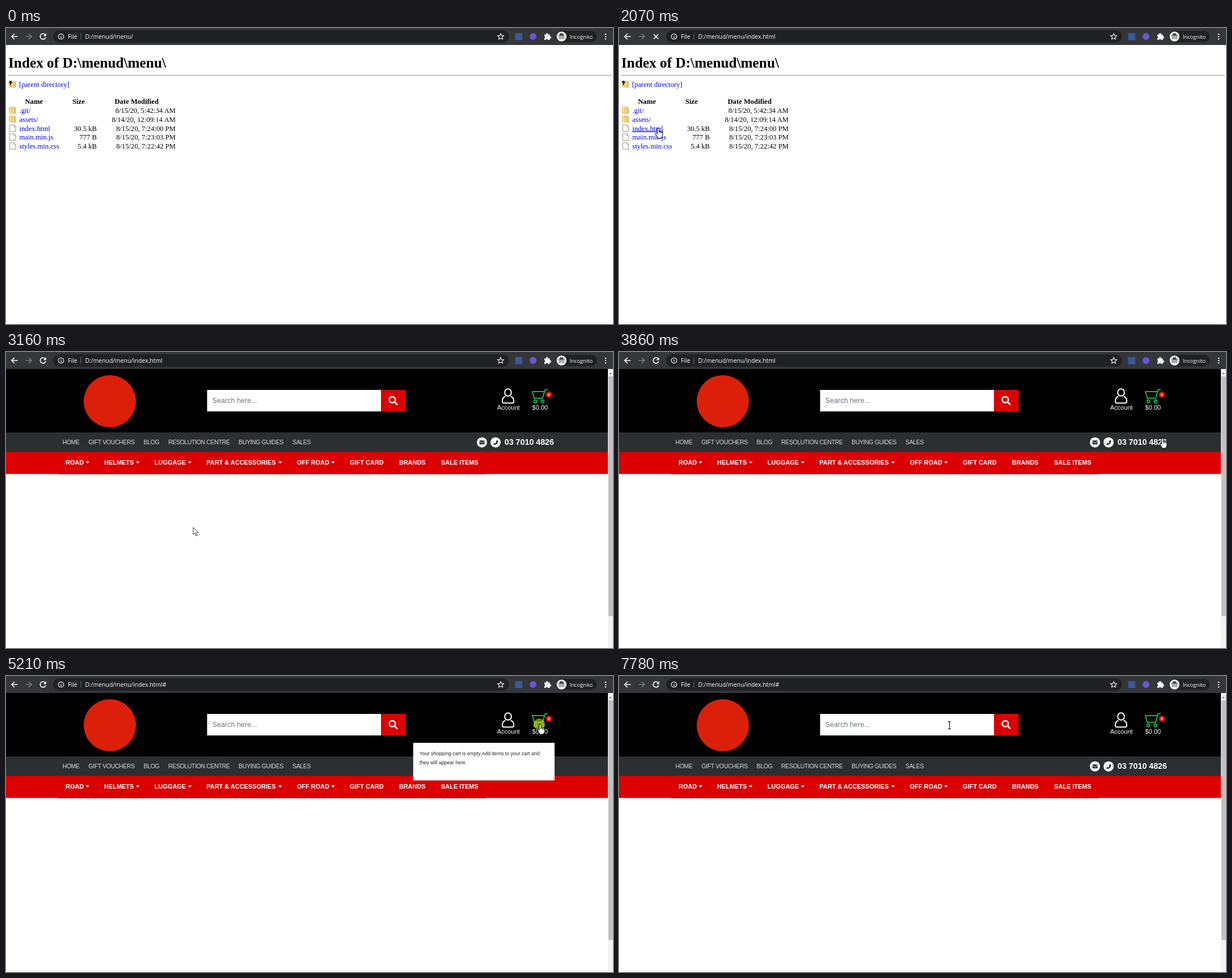
An HTML page for the animation above (8 s loop, 1070 by 523 pixels).

```html
<!DOCTYPE html>
<html lang="en">
<head>
<meta charset="utf-8">
<title>Menu demo</title>
<style>
  html, body { margin: 0; width: 100%; height: 100%; overflow: hidden; background: #fff; }
  svg { display: block; width: 1070px; height: 523px; }
  text { white-space: pre; }
  .ui { font-family: "Open Sans", "Noto Sans", sans-serif; fill: #fff; }
  .list { font: 12.63px "Liberation Serif", "Times New Roman", serif; fill: #000; }
  .list .link { fill: #0000ee; }
  .bold { font-weight: bold; }
  .shop { font-family: "Liberation Sans", Arial, sans-serif; font-size: 11.05px; fill: #fff; }
  .top { font-size: 10.5px; letter-spacing: -.35px; fill: #d9dadb; }
  .menu { font-size: 10.95px; font-weight: bold; }
  .line { fill: none; stroke: #fff; stroke-width: 1.6; }
  .thin { stroke-width: 1.1; }
  .thick { stroke-width: 2; }
  .lens { stroke-width: 2.5; }
  .green { stroke: #1fb24a; }
  .faded { stroke: #7d7e81; }
  .end { text-anchor: end; }
</style>
</head>
<body>
<svg viewBox="0 0 1070 523" xmlns="http://www.w3.org/2000/svg">
  <defs>
    <linearGradient id="gold"><stop offset="0" stop-color="#fbe7a6"/><stop offset="1" stop-color="#e3b44c"/></linearGradient>
    <g id="folder">
      <path d="M0 1.5 5 0v12L0 11Z" fill="#f7dc8b" stroke="#d3a64a" stroke-width=".6"/>
      <path d="M5 1h5.5l1 2v9H5Z" fill="url(#gold)" stroke="#d3a64a" stroke-width=".6"/>
    </g>
    <path id="file" d="M.5.5h7.5l3 3v8.5H.5Z M8 .5v3h3" fill="#fbfbfb" stroke="#8c8c8c" stroke-width=".9"/>
  </defs>

  <rect width="1070" height="523" fill="#fff"/>

  <g id="dir" class="list">
    <text x="4" y="69.8" class="bold" font-size="25.27">Index of D:\menud\menu\</text>
    <rect x="4" y="83" width="1064" height="1" fill="#a5a5a5"/>
    <rect x="4" y="84" width="1064" height="1" fill="#e3e3e3"/>
    <use href="#folder" x="5.5" y="93"/>
    <path d="M7 101v-4H4.3L8 92.500 11.700 97H9v4Z" fill="#222"/>
    <text x="23" y="103.5" class="link">[parent directory]</text>
    <g class="bold">
      <text x="33.5" y="134">Name</text><text x="117" y="134">Size</text><text x="191.5" y="134">Date Modified</text>
    </g>
  </g>

  <g id="site" class="shop">
    <rect y="30" width="1061" height="112" fill="#000"/>
    <rect y="142" width="1061" height="35" fill="#2c2f32"/>
    <rect y="176.5" width="1061" height="39" fill="#dc0000"/>
    <rect x="92" y="215" width="753" height="1" fill="#dc0000"/>
    <circle cx="183" cy="87" r="46" fill="#dc1f08"/>

    <rect x="354.5" y="67" width="307" height="38" fill="#fff"/>
    <text x="363.5" y="90" font-size="12.63" fill="#6c757d">Search here...</text>
    <rect id="caret" x="364" y="79" width="1" height="14" fill="#222"/>
    <rect x="661" y="67" width="43.5" height="38" fill="#dc0000"/>
    <g class="line lens">
      <circle cx="681" cy="84.3" r="5.3"/><path d="M684.8 88.2 690 93.3"/>
    </g>

    <g class="line thick">
      <rect x="879.2" y="65.3" width="11.6" height="12.4" rx="5.6"/>
      <path d="M880.5 78.5Q875 80.5 875 86v1.5q0 2.7 2.7 2.7h14.6q2.7 0 2.7-2.7V86q0-5.5-5.5-7.5"/>
    </g>
    <text x="865.7" y="102">Account</text>
    <g class="line thick green">
      <path d="M955 66.500h-4.500l-4.600 15.200h-14.700L928 70h20.500"/>
      <circle cx="933.2" cy="87.2" r="2.5"/><circle cx="945.8" cy="87.2" r="2.5"/>
    </g>
    <circle cx="957" cy="75.5" r="5.7" fill="#dc0000"/>
    <text x="957" y="78.3" font-size="8" class="bold" text-anchor="middle">0</text>
    <text x="927.6" y="102">$0.00</text>

    <circle cx="839" cy="159.7" r="9"/><circle cx="863" cy="159.7" r="9"/>
    <rect x="834.5" y="156.3" width="9" height="7" rx="1" fill="#2c2f32"/>
    <path d="M834.5 157.8 839 161l4.5-3.2" fill="none" stroke="#fff" stroke-width=".8"/>
    <path d="M866.3 155.2l1.1 2.8q-.6 5.2-6.2 6.3l-2.5-1.2 1.8-2.2 1.7.7q1.6-.8 2.2-2.3l-.9-1.6Z" fill="#2c2f32"/>
    <text x="878.8" y="164" font-size="14.25" class="bold">03 7010 4826</text>

    <rect x="1061" y="30" width="9" height="493" fill="#f1f1f1"/>
    <rect x="1062" y="43" width="8" height="423.5" fill="#c1c1c1"/>
    <path d="M1063 39.2h5l-2.5-3Z" fill="#777"/>

    <g id="drop">
      <rect x="717.8" y="118" width="249.2" height="66.5" rx="1" fill="#fff"/>
      <g font-size="8.75" fill="#212529">
        <text x="729" y="140">Your shopping cart is empty.Add items to your cart and</text>
        <text x="729" y="156">they will appear here.</text>
      </g>
    </g>
  </g>

  <g class="ui">
    <rect width="1070" height="30" fill="#35363a"/>
    <rect x="83" y="4" width="803.5" height="22" rx="11" fill="#202124"/>
    <path class="line" d="M20.500 15H10M15 10l-5 5 5 5"/>
    <path class="line faded" d="M34.500 15H45M40 10l5 5-5 5"/>
    <g id="reload">
      <path class="line" d="M69 11.800A4.900 4.900 0 1 0 70 16.200"/><path d="M70.800 9.200v5h-5Z"/>
    </g>
    <path id="stop" class="line" d="M61 11l8.500 8.500M69.500 11 61 19.500"/>
    <circle class="line thin" cx="97" cy="15" r="4.8"/>
    <path d="M96.400 14.200h1.200v3.600h-1.200ZM96.400 12h1.200v1.300h-1.200Z"/>
    <text x="109" y="19" font-size="10.5">File</text>
    <rect x="131.5" y="9" width="1" height="12" fill="#6b6c70"/>
    <text id="url" x="139.5" y="19" font-size="10.4"></text>
    <path class="line thin" transform="translate(872 15.3)"
      d="M0-5.500 1.600-1.900 5.400-1.600 2.500.9 3.400 4.600 0 2.600-3.400 4.600-2.500.9-5.400-1.600-1.600-1.900Z"/>
    <rect x="897.5" y="9" width="12.5" height="12.5" fill="#36599f"/>
    <circle cx="929" cy="15" r="6" fill="#6a55d8"/>
    <path d="M949 11.500h3a1.900 1.900 0 1 1 3.600 0h3v3.300a1.900 1.900 0 1 1 0 3.600v2.600h-3.300a1.800 1.800 0 0 0-3.500 0H949v-3a1.900 1.900 0 0 0 0-3.500Z"/>
    <rect x="969.5" y="5" width="72" height="20" rx="10" fill="#202124"/>
    <circle cx="979.3" cy="15" r="8.7" fill="#f1f3f4"/>
    <g fill="#35363a">
      <path d="M973.500 13.300h11.600v1.100h-11.600ZM975.500 12.700l1.100-3.500 2.700.6 2.700-.6 1.100 3.500ZM978 16.700h2.600v.8H978Z"/>
      <circle cx="976.5" cy="17.5" r="2"/><circle cx="982.1" cy="17.5" r="2"/>
    </g>
    <g fill="#f1f3f4">
      <circle cx="976.5" cy="17.5" r="1.2"/><circle cx="982.1" cy="17.5" r="1.2"/>
    </g>
    <text x="993.8" y="18.5" font-size="9.3">Incognito</text>
    <circle cx="1057" cy="11" r="1.2"/><circle cx="1057" cy="15.2" r="1.2"/><circle cx="1057" cy="19.4" r="1.2"/>
  </g>

  <circle id="press" r="10" fill="#ffff00" fill-opacity=".5"/>
  <g id="pointer" stroke-linejoin="round">
    <path id="arrow" d="M0 0v12.600l2.900-2.700 2.100 5 2.300-1-2.100-4.800h3.900Z" fill="#fff" stroke="#000" stroke-width=".8"/>
    <path id="hand" fill="#fff" stroke="#000"
      d="M-1.500 1.200Q0-.6 1.500 1.200V6Q3 4.800 4 6.600 5.600 5.600 6.300 7.400 8 6.800 8 9v3q0 2.500-1.500 4v2H-1.200v-1.700L-4.600 11Q-5 8.600-3 9.200l1.500 1.600ZM1.500 6v3M4 6.600V9.300M6.300 7.400v2.200"/>
    <path id="beam" d="M-2.500-6.500h2l.5.500.5-.5h2M0-6V6M-2.500 6.500h2L0 6l.5.500h2" fill="none" stroke="#000" stroke-width="1.1"/>
  </g>
</svg>

<script>
const LOOP = 8000;
const $ = id => document.getElementById(id);
const show = (id, on) => { $(id).style.display = on ? "" : "none"; };

function add(parent, tag, attrs, text = "") {
  const el = document.createElementNS("http://www.w3.org/2000/svg", tag);
  for (const key in attrs) el.setAttribute(key, attrs[key]);
  el.textContent = text;
  parent.append(el);
  return el;
}

const links = [
  ["folder", ".git/", "", "8/15/20, 5:42:34 AM"],
  ["folder", "assets/", "", "8/14/20, 12:09:14 AM"],
  ["file", "index.html", "30.5 kB", "8/15/20, 7:24:00 PM"],
  ["file", "main.min.js", "777 B", "8/15/20, 7:23:03 PM"],
  ["file", "styles.min.css", "5.4 kB", "8/15/20, 7:22:42 PM"]
].map(([icon, name, size, date], i) => {
  const y = 150 + i * 15.8, dir = $("dir");
  add(dir, "use", { href: "#" + icon, x: icon === "file" ? 6 : 5.5, y: y - 11 });
  add(dir, "text", { x: 160, y, class: "end" }, size);
  add(dir, "text", { x: 299, y, class: "end" }, date);
  return add(dir, "text", { x: 23.5, y, class: "link" }, name);
});

const site = $("site");
[["HOME", 99.5], ["GIFT VOUCHERS", 145.3], ["BLOG", 242.5], ["RESOLUTION CENTRE", 286],
 ["BUYING GUIDES", 410], ["SALES", 505]]
  .forEach(([label, x]) => add(site, "text", { x, y: 163.2, class: "top" }, label));

[["ROAD", 105, 140.5], ["HELMETS", 173, 229], ["LUGGAGE", 261.8, 320.8], ["PART & ACCESSORIES", 353.3, 480],
 ["OFF ROAD", 512.7, 573.3], ["GIFT CARD", 606], ["BRANDS", 692.8], ["SALE ITEMS", 767]]
  .forEach(([label, x, caret]) => {
    add(site, "text", { x, y: 199.3, class: "menu" }, label);
    if (caret) add(site, "path", { d: `M${caret} 193.5h6.4l-3.2 3.4Z` });
  });
site.append($("drop"));

// Pointer moves: start, end, number of steps, waypoints [x, y, shape]
const moves = [
  [530, 1280, 11, [[874, 488, "arrow"], [640, 420, "arrow"], [360, 310, "arrow"], [170, 225, "arrow"], [105, 200, "arrow"], [81, 193, "hand"]]],
  [1370, 1690, 5, [[79, 190, "hand"], [74, 182, "hand"], [69, 176.5, "hand"]]],
  [3000, 3500, 7, [[90, 215, "arrow"], [330, 310, "arrow"], [720, 338, "arrow"], [1021, 240, "arrow"]]],
  [3720, 4170, 7, [[1000, 215, "arrow"], [958, 152, "hand"], [936, 100, "hand"], [939, 79.5, "hand"]]],
  [4740, 4970, 4, [[939, 80, "hand"], [941.5, 85, "hand"]]],
  [5670, 6060, 6, [[905, 90, "arrow"], [790, 108, "arrow"], [640, 126, "arrow"], [575, 120.5, "arrow"], [578, 103, "beam"], [582.5, 87, "beam"]]]
];

function pointerAt(t) {
  const move = moves.filter(m => t >= m[0]).pop();
  if (!move) return null;
  const [from, to, steps, pts] = move;
  const k = Math.min(steps - 1, Math.floor((t - from) / (to - from) * (steps - 1) + 0.2));
  const u = k / (steps - 1) * (pts.length - 1);
  const i = Math.floor(u + 1e-6), f = u - i;
  const a = pts[i], b = pts[Math.min(i + 1, pts.length - 1)];
  return { x: a[0] + (b[0] - a[0]) * f, y: a[1] + (b[1] - a[1]) * f, shape: a[2] };
}

const within = (t, ...spans) => spans.some(([a, b]) => t >= a && t < b);

function draw(t) {
  const loaded = t >= 2150;
  const loading = within(t, [2000, 2230]);
  show("dir", !loaded);
  show("site", loaded);
  show("stop", loading);
  show("reload", !loading);
  $("url").textContent = "D:/menud/menu/" + (t >= 2000 ? "index.html" : "") + (t >= 4500 ? "#" : "");
  show("drop", within(t, [4560, 5350]));
  show("caret", within(t, [6230, 6760], [7300, 7780]));

  const p = pointerAt(t);
  show("pointer", p);
  show("press", p && within(t, [4340, 4500], [5210, 5350], [6230, 6370]));
  if (p) {
    $("pointer").setAttribute("transform", `translate(${p.x} ${p.y})`);
    for (const id of ["arrow", "hand", "beam"]) show(id, id === p.shape);
    $("press").setAttribute("cx", p.shape === "hand" ? p.x - 1.5 : p.x);
    $("press").setAttribute("cy", p.y);
  }
  const row = p && p.shape === "hand" ? Math.floor((p.y - 138) / 15.8) : -1;
  links.forEach((link, i) => {
    link.style.textDecoration = i === row ? "underline" : "none";
    link.style.fill = i === row && within(t, [1850, 2000]) ? "#ee0000" : "";
  });
}

const start = performance.now();
function tick() {
  draw((performance.now() - start) % LOOP);
  requestAnimationFrame(tick);
}
tick();
</script>
</body>
</html>
```
